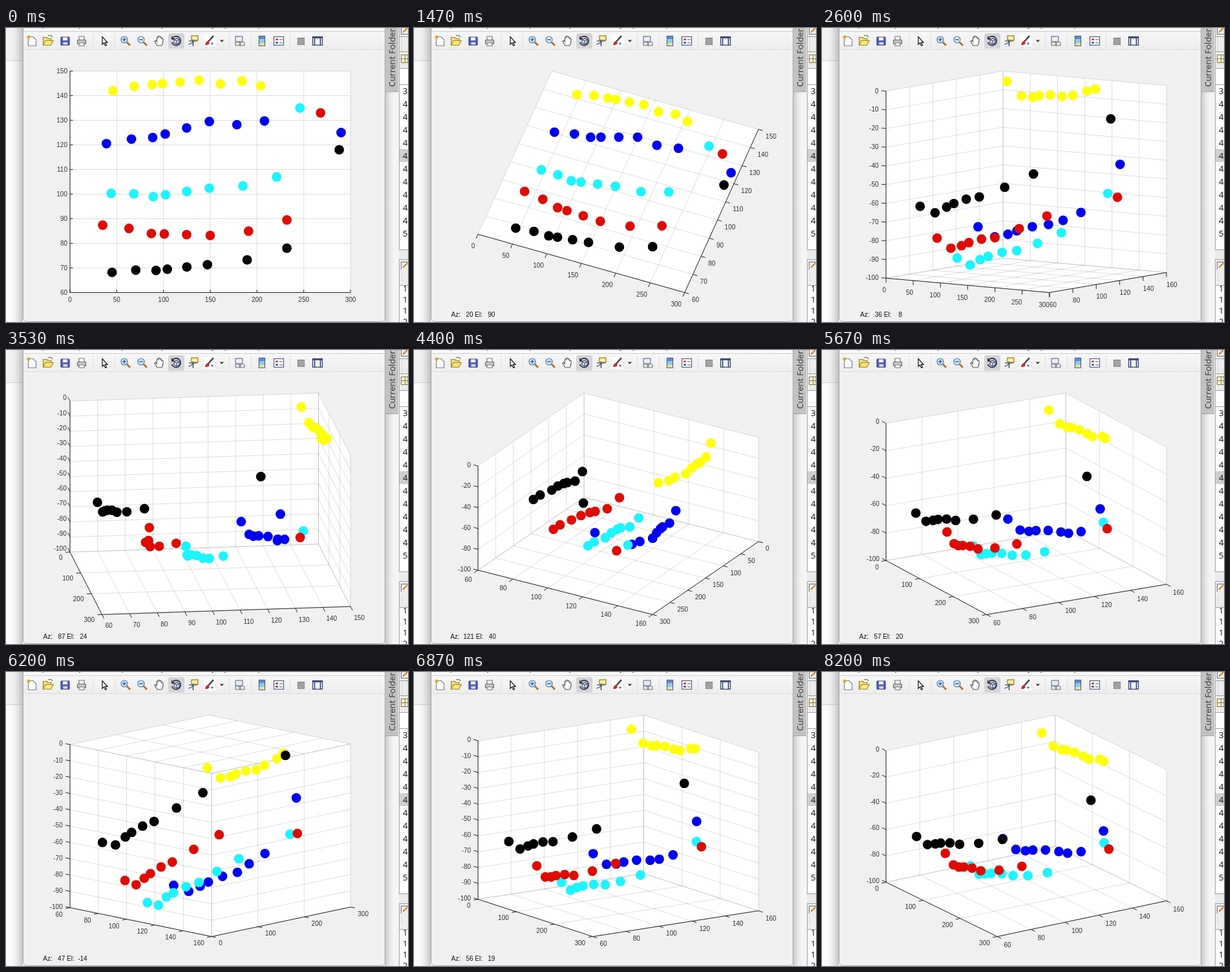
Write an HTML page that moves like this. It is 622 px wide and 454 px high and loops after 8470 ms.

```html
<!DOCTYPE html>
<html lang="en">
<head>
<meta charset="utf-8">
<title>Rotating scatter plot</title>
<style>
html, body { margin: 0; width: 100%; height: 100%; overflow: hidden; background: #fff; }
svg { display: block; width: 622px; height: 454px; }
text { white-space: pre; }
#plot text, #angle { font: 10px "Liberation Sans", Arial, sans-serif; fill: #333; }
#plot .grid { stroke: #262626; stroke-opacity: .15; fill: none; }
#plot .axis { stroke: #262626; fill: none; }
.rows text { font: 13px "Open Sans", sans-serif; fill: #111; }
</style>
</head>
<body>
<svg viewBox="0 0 622 454">
<defs>
  <linearGradient id="shadeL"><stop offset="0" stop-color="#fff" stop-opacity="0"/><stop offset="1" stop-color="#999" stop-opacity=".6"/></linearGradient>
  <linearGradient id="shadeR"><stop offset="0" stop-color="#999" stop-opacity=".55"/><stop offset="1" stop-color="#fff" stop-opacity="0"/></linearGradient>
  <linearGradient id="bar" x2="0" y2="1"><stop offset="0" stop-color="#f7f7f7"/><stop offset="1" stop-color="#ededed"/></linearGradient>
</defs>

<rect width="622" height="454" fill="#fcfcfc"/>
<rect width="26" height="50" fill="#f1f1f1"/>
<path d="M0 50.5H26" stroke="#c8c8c8"/>
<rect x="4" width="22" height="454" fill="url(#shadeL)"/>
<rect x="587" width="22" height="454" fill="#f4f4f4"/>
<rect x="586" width="18" height="454" fill="url(#shadeR)"/>

<rect x="587" width="20" height="98" fill="#c2c2c2"/>
<path d="M587 98.5H607" stroke="#a5a5a5"/>
<text transform="translate(602 91) rotate(-90)" font-family="Open Sans, sans-serif" font-size="13.3" fill="#333">Current Folder</text>

<g class="rows">
  <rect x="608" width="14" height="454" fill="#fff"/>
  <rect x="608" width="14" height="62" fill="#ececec"/>
  <rect x="608" y="343" width="14" height="54" fill="#ececec"/>
  <path d="M608.5 0V342M608.5 357V454M608 13.5H622M608 36.5H622M608 62.5H622M608 87.5H622M608 342.5H622M608 357.5H622M608 397.5H622" stroke="#a0a0a0" fill="none"/>
  <path d="M611.5 41.5H622V53.5H611.5ZM611 47.5H622M617.5 42V53" stroke="#887433" fill="#fffbe0"/>
  <path d="M611.5 0V9.5H622M611.5 373V361.5H622" stroke="#666" fill="#fff"/>
  <path d="M614 7L621 0M614 370L621 363" stroke="#d07822" stroke-width="2"/>
  <path d="M612.5 380V392M612.5 17V33" stroke="#aaa" stroke-dasharray="1 2"/>
  <g id="rows"></g>
</g>

<path d="M26.5 0V447Q26.5 453.5 33 453.5H580Q586.5 453.5 586.5 447V0Z" fill="#f0f0f0" stroke="#a9a9a9"/>
<rect x="27" width="559" height="5" fill="#f8f8f8"/>
<rect x="27" y="5" width="559" height="29" fill="url(#bar)"/>
<path d="M27 5.5H586" stroke="#d0d0d0"/>
<path d="M27 33.5H586" stroke="#dcdcdc"/>
<path d="M56 .5H58M113 .5H115M179 .5H181M240 .5H242M318 .5H321M338 .5H340M390 .5H392" stroke="#666"/>

<g fill="none" stroke-width="1.2">
  <rect x="251" y="8" width="25" height="24" rx="3" fill="#d5d5d8"/>
  <path d="M134.5 9V31M168.5 9V31M345.5 9V31M379.5 9V31M439.5 9V31" stroke="#e0e0e0"/>
  <path d="M34.5 13.5H42L46.5 18V27.5H34.5Z" fill="#fff" stroke="#7d8794"/>
  <circle cx="35" cy="14" r="2.6" fill="#e9a21b"/>
  <path d="M57.5 26.5V14.5H63L65 16.5H70V19" fill="#f6df82" stroke="#a08425"/>
  <path d="M57.5 26.5L61 19.5H73L69.5 26.5Z" fill="#ffe978" stroke="#a08425"/>
  <path d="M65 12Q70 10 72 14" stroke="#4b8a45"/>
  <rect x="85" y="14" width="13" height="12.5" rx="1" fill="#5a62c0" stroke="#303886"/>
  <path d="M88 14.5H95V19H88Z" fill="#fff"/><path d="M88.5 22H95V26H88.5Z" fill="#cfd3e4"/>
  <path d="M113 19V13H121V19" fill="#fff" stroke="#777"/>
  <rect x="110.5" y="18.5" width="13" height="6" rx="1" fill="#c9c9c9" stroke="#666"/>
  <path d="M113 23H121V27.5H113Z" fill="#fff" stroke="#777"/>
  <path d="M149 13.5V25.5L151.7 23L153.7 27.5L155.6 26.6L153.6 22.3H157Z" fill="#fff" stroke="#111"/>
  <g id="lens"><path d="M187 22L192 27" stroke="#b0762f" stroke-width="3"/><circle cx="183" cy="18" r="5" fill="#d7ecfb" stroke="#4c78a8"/><path d="M180.3 18H185.7" stroke="#2457a0" stroke-width="1.5"/></g>
  <use href="#lens" x="26"/><path d="M183 15.3V20.7" stroke="#2457a0" stroke-width="1.5"/>
  <path d="M234 27L230 20.5Q231 18.5 233.5 21V14.5Q234.5 13 235.5 14.5V13Q236.7 11.5 238 13V14Q239.2 13 240.4 14.5V16.5Q242 15.5 243 17V22L241 27Z" fill="#fff" stroke="#555"/>
  <path d="M258 15A7 7 0 1 1 256.5 22" stroke="#303850" stroke-width="1.8"/>
  <path d="M256 12V18H262Z" fill="#303850"/>
  <path d="M260 18L264 16L268 18V23L264 25L260 23ZM260 18L264 20L268 18M264 20V25" stroke="#48536d" fill="#dce5f3"/>
  <path d="M283 20H296M289.5 15V28" stroke="#222"/>
  <rect x="287" y="12" width="10" height="7" fill="#fff19a" stroke="#8b7431"/>
  <path d="M282 25Q288 25 290 18" stroke="#3a5db5"/>
  <rect x="306" y="11" width="18" height="18" fill="#fff"/>
  <path d="M313 21L321 12" stroke="#444" stroke-width="2.6"/>
  <path d="M308 26Q309 20 313 20L315 23Q313 27 308 26Z" fill="#d42a20"/>
  <circle cx="319" cy="24" r="1.5" fill="#3157c5"/>
  <path d="M331 18.5H337L334 22Z" fill="#333"/>
  <rect x="355" y="13" width="11" height="8" fill="#e7edf6" stroke="#64758e"/>
  <rect x="361" y="22" width="8" height="5" rx="2" stroke="#777"/><rect x="355" y="22" width="8" height="5" rx="2" stroke="#777"/>
  <rect x="391.5" y="12.5" width="9" height="15" fill="#8ccde5" stroke="#46618a"/>
  <path d="M392 13H400V17H392Z" fill="#6488d3"/><path d="M392 23H400V27H392Z" fill="#f0e38c"/>
  <rect x="414.5" y="13.5" width="15" height="13" fill="#fff" stroke="#53617b"/>
  <path d="M417 16.5H421V19H417Z" fill="#d33"/><path d="M417 21.5H421V24H417Z" fill="#35c"/><path d="M423 18H428M423 23H428" stroke="#555"/>
  <rect x="451.5" y="15.5" width="10" height="10" fill="#a3a3a3" stroke="#888"/>
  <rect x="474.5" y="13.5" width="15" height="13" fill="#fff" stroke="#303d63"/>
  <path d="M475 15H489M477.5 16V26M486.5 16V26" stroke="#46558a" stroke-width="2"/>
</g>

<g id="plot"></g>
<text id="angle" x="91.5" y="446" text-anchor="middle" style="fill:#111"></text>
</svg>

<script>
const LOOP = 8470, STEP = LOOP / 127;
const BOX = { x: 99, y: 66.5, w: 434, h: 342 };
const get = id => document.getElementById(id);
const mix = (a, b, u) => a + (b - a) * u;

// each row of markers follows a path through five [x, y, z] points
const paths = {
  '#ffff0a': [[46, 142, -2.4], [88, 144.5, -10], [138, 146.3, -8.5], [184, 146, -4.5], [204, 144, -2.7]],
  '#0000f2': [[39, 120.5, -78], [88.5, 123, -81], [149, 129.5, -75], [208, 129.7, -67], [290, 125, -38.7]],
  '#1cf4ff': [[44, 100.3, -92.4], [89, 99, -92], [149, 102.4, -86], [221, 107, -75], [246, 135, -56.5]],
  '#de0b02': [[35, 87.4, -80.6], [87, 84, -83], [150, 83.2, -77], [232, 89.5, -64], [268, 133, -57.7]],
  '#000': [[45, 68.2, -61.3], [92, 69, -60.6], [147, 71.3, -54], [232, 78, -40.3], [288, 118, -13.7]]
};
// marker places along a path, and how far each stretch bows in x, y, z
const stops = [0, .54, 1, 1.22, 1.6, 2, 2.5, 3, 4];
const bows = [[0, .5, -3.3], [0, 0, 1], [0, -1.4, -.8], [0, 0, 0]];

const points = Object.entries(paths).flatMap(([color, path]) => stops.map(s => {
  const i = Math.min(Math.floor(s), 3), u = s - i;
  const pos = path[i].map((v, k) => mix(v, path[i + 1][k], u) + bows[i][k] * 4 * u * (1 - u));
  return { color, pos };
}));
const extent = [0, 1, 2].map(k => {
  const v = points.map(p => p.pos[k]);
  return [Math.min(...v), Math.max(...v)];
});
const tickSteps = [[50, 100, 200], [10, 20], [10, 20, 50, 100]];

// time, azimuth, elevation, and their speeds per ms
const keys = [
  [530, 0, 90, 0, 0],
  [1540, 20.2, 90, .004, 0],
  [2600, 35.6, 7.5, .008, .003],
  [4400, 121.3, 39.3, 0, .01],
  [5670, 60.7, 24.2, -.05, -.057],
  [6200, 45.5, -14.2, .02, 0],
  [7200, 56.7, 26.3, 0, 0]
];

function pose(t) {
  const last = keys[keys.length - 1];
  if (t <= keys[0][0]) return [0, 90];
  if (t >= last[0]) return [last[1], last[2]];
  const i = keys.findIndex(k => k[0] > t);
  const a = keys[i - 1], b = keys[i], h = b[0] - a[0], u = (t - a[0]) / h;
  return [1, 2].map(k => mix(a[k], b[k], u * u * (3 - 2 * u))
    + h * (a[k + 2] * u * (1 - u) ** 2 - b[k + 2] * u * u * (1 - u)));
}

function camera(az, el) {
  const r = Math.PI / 180, c = Math.cos(az * r), s = Math.sin(az * r);
  const ce = el >= 90 ? 0 : Math.cos(el * r), se = Math.sin(el * r);
  const flat = ([x, y, z]) => [x * c + y * s, z * ce + se * (y * c - x * s)];
  const all = Array.from({ length: 8 }, (_, i) => flat([i & 1, i >> 1 & 1, i >> 2]));
  const range = k => {
    const v = all.map(p => p[k]), lo = Math.min(...v);
    return [lo, Math.max(...v) - lo];
  };
  const [x0, w] = range(0), [y0, h] = range(1);
  return {
    c, s,
    project(p) {
      const [x, y] = flat(p);
      return [BOX.x + (x - x0) / w * BOX.w, BOX.y + BOX.h - (y - y0) / h * BOX.h];
    },
    depth: ([x, y, z]) => ce * (x * s - y * c) + z * se
  };
}

// finest tick step whose labels stay clear of each other
function scale(k, from, to) {
  const dx = (to[0] - from[0]) / 40, dy = (to[1] - from[1]) / 23;
  let out;
  for (const step of tickSteps[k]) {
    const lo = Math.floor(extent[k][0] / step) * step;
    const hi = Math.ceil(extent[k][1] / step) * step;
    const n = Math.round((hi - lo) / step);
    out = { lo, hi, ticks: Array.from({ length: n + 1 }, (_, i) => [lo + i * step, i / n]) };
    if (Math.hypot(dx, dy) >= n) break;
  }
  return out;
}

const f = v => v.toFixed(1);
const line = pts => 'M' + pts.map(p => f(p[0]) + ' ' + f(p[1])).join('L');
const label = (x, y, anchor, v) =>
  `<text x="${f(x)}" y="${f(y + 3.6)}" text-anchor="${anchor}">${v}</text>`;
const unit = (a, b) => {
  const x = a[0] - b[0], y = a[1] - b[1], l = Math.hypot(x, y) || 1;
  return [x / l, y / l];
};
const along = (k, v, base) => base.map((b, i) => i === k ? v : b);

function drawPlot(az, el) {
  const cam = camera(az, el), P = cam.project;
  const top = el >= 90, plan = top && az < .01;
  const near = [cam.s > 1e-6 ? 1 : 0, cam.c > 0 ? 0 : 1];
  const far = near.map(v => 1 - v);
  const base = [...(el >= 0 ? near : far), 0];
  const back = [...far, el >= 0 ? 0 : 1];
  const sides = [[near[0], far[1], 0], [far[0], near[1], 0]];
  const left = P(sides[0])[0] < P(sides[1])[0] ? sides[0] : sides[1];
  const bases = [base, base, left];
  const scales = bases.map((b, k) => scale(k, P(along(k, 0, b)), P(along(k, 1, b))));

  let faces = '', grid = '', axis = '', labels = '';
  for (let k = 0; k < 3; k++) {
    if (top && k < 2) continue;
    const [i, j] = [0, 1, 2].filter(n => n !== k);
    faces += line([[0, 0], [1, 0], [1, 1], [0, 1]].map(([a, b]) =>
      P(along(j, b, along(i, a, back))))) + 'Z';
    for (const [m, n] of [[i, j], [j, i]])
      for (const [, v] of scales[m].ticks) {
        const q = along(m, v, back);
        grid += line([P(along(n, 0, q)), P(along(n, 1, q))]);
      }
  }

  bases.forEach((b, k) => {
    if (k === 2 && top) return;
    axis += line([P(along(k, 0, b)), P(along(k, 1, b))]);
    const o = 1 - k;
    const dir = k === 2 ? unit(P(left), P(base)) : unit(P(base), P(along(o, 1 - base[o], base)));
    const anchor = Math.abs(dir[0]) < .01 ? 'middle' : dir[0] < 0 ? 'end' : 'start';
    const [dx, dy] = k < 2 && Math.abs(el) < 10 ? [0, 1] : dir;
    const len = plan ? -4.5 : 7;
    for (const [v, n] of scales[k].ticks) {
      const [x, y] = P(along(k, n, b));
      axis += line([[x, y], [x + dx * len, y + dy * len]]);
      if (plan) labels += label(x + dx * 4, y + dy * 11, anchor, v);
      else labels += label(x + dx * 11.5, y + (k === 2 ? dy * 6 : 8 + dy * 10.5), anchor, v);
    }
  });

  const dots = points.map(({ color, pos }) => {
    const n = pos.map((v, k) => (v - scales[k].lo) / (scales[k].hi - scales[k].lo));
    return { color, at: P(n), depth: cam.depth(n) };
  }).sort((a, b) => a.depth - b.depth).map(d =>
    `<circle cx="${f(d.at[0])}" cy="${f(d.at[1])}" r="7.4" fill="${d.color}"/>`).join('');

  get('plot').innerHTML = `<path d="${faces}" fill="#fff"/><path class="grid" d="${grid}"/>`
    + `<path class="axis" d="${axis}"/>${labels}${dots}`;
}

function render(time) {
  const t = Math.floor(((time % LOOP) + 5) / STEP) * STEP;
  drawPlot(...pose(t));
  // the readout runs one step ahead of the plot
  const [az, el] = pose(t + STEP).map(v => String(Math.round(v) || 0).padStart(4));
  get('angle').textContent = t > 190 && t < 7660 ? `Az: ${az} El: ${el}` : '';
}

function fillRows() {
  const row = (y, v) => `<text x="614" y="${y}">${v}</text>`;
  let out = '<rect x="609" y="187" width="13" height="20" fill="#cfcfcf"/>';
  for (let i = 0; i < 12; i++) out += row(102 + i * 20, i === 0 ? 3 : i === 11 ? 5 : 4);
  for (let i = 0; i < 4; i++) out += row(407 + i * 17, i < 3 ? 1 : 2);
  get('rows').innerHTML = out;
}

fillRows();
const start = performance.now();
function tick() {
  render(performance.now() - start);
  requestAnimationFrame(tick);
}
tick();
</script>
</body>
</html>
```
